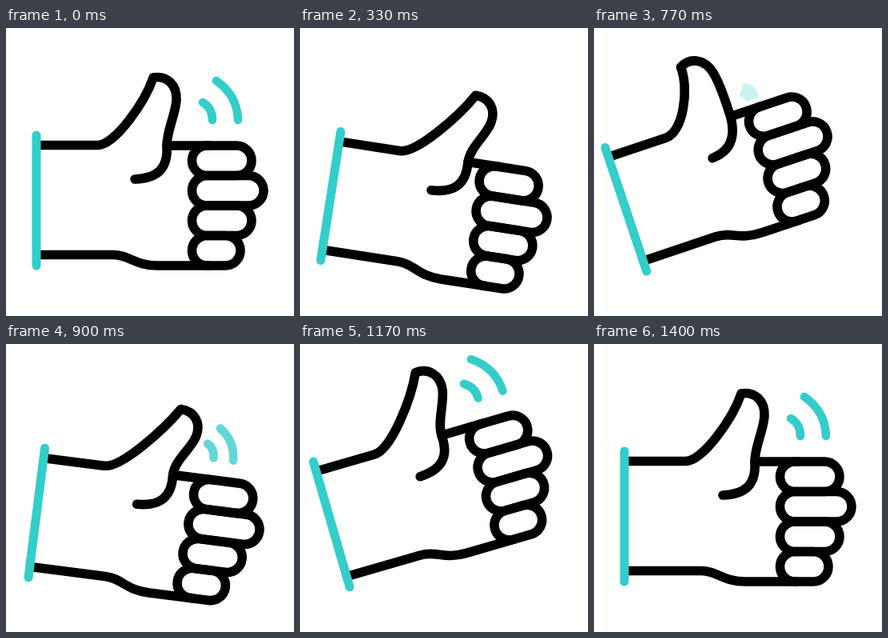
An HTML page that plays this animation: 360 by 360 pixels, repeating every 1.67 s.

```html
<!DOCTYPE html>
<html lang="en">
<head>
<meta charset="utf-8">
<title>Thumbs up</title>
<style>
  html, body { margin: 0; width: 100%; height: 100%; overflow: hidden; background: #fff; }
  svg { display: block; width: 100%; height: 100%; }
  path, rect { fill: none; stroke: #000; stroke-width: 11.6; stroke-linecap: round; stroke-linejoin: round; }
  .accent { stroke: #33cdca; stroke-width: 11; }
  .butt { stroke-linecap: butt; }
</style>
</head>
<body>
<svg viewBox="0 0 360 360">
  <g id="hand">
    <path id="thumb"/>
    <path id="knuckle"/>
    <path id="palm" class="butt"/>
    <g id="fingers"></g>
    <path class="accent" d="M38 134V297"/>
    <path id="waves" class="accent" d="M246 93Q258 100 258 115M263 66Q289 84 290 115"/>
  </g>
</svg>
<script>
const LOOP = 1670, STEP = 100 / 3;
const PIVOT = [73.5, 215.5];     // wrist
const JOINT = [201, 147];        // thumb base
const WAVE_ORIGIN = [217, 136];
const SHIFT = 15;                // how far the fingers pull back
const ROW = 37.5, LEFT = 232.5;
const WIDTHS = [74.5, 89.5, 74.5, 60.5];

// [time in ms, value], eased between neighbours
const SWING = [[67, 0], [467, 11.8], [710, -23.5], [930, 8.7], [1160, -16.2], [1400, 0]];
const BEND = [[67, 0], [400, 10], [750, -18], [920, 12], [1370, 0]];
const LENGTH = [[67, 1], [330, 0.965], [570, 0.95], [760, 1.03], [900, 0.955], [1400, 1]];
const CREASE = [[330, 0], [570, -6], [770, -6], [900, 0]];
const WAVES = [[67, 1], [300, 0], [640, 0], [1020, 1]];

const $ = id => document.getElementById(id);
const ease = u => (1 - Math.cos(Math.PI * Math.min(1, Math.max(0, u)))) / 2;

function sample(keys, t) {
  let value = keys[0][1];
  for (let i = 1; i < keys.length; i++) {
    const [t0, v0] = keys[i - 1], [t1, v1] = keys[i];
    if (t >= t0) value = v0 + (v1 - v0) * ease((t - t0) / (t1 - t0));
  }
  return value;
}

const fingers = WIDTHS.map((w, i) => {
  const r = document.createElementNS('http://www.w3.org/2000/svg', 'rect');
  const box = { x: LEFT, y: 147 + i * ROW, width: w, height: ROW, rx: ROW / 2 };
  for (const k in box) r.setAttribute(k, box[k]);
  return $('fingers').appendChild(r);
});

function pullBack(i, t) {
  const back = ease((t - 80 - 36 * i) / 300);
  const out = ease((t - 750 - 20 * i) / 210);
  return SHIFT * (back - out);
}

// Rotates points around the thumb base and scales the thumb's height
function bendPoints(deg, length, ...points) {
  const a = deg * Math.PI / 180, c = Math.cos(a), s = Math.sin(a);
  return points.map(([px, py]) => {
    const x = px - JOINT[0], y = py - JOINT[1];
    return (JOINT[0] + x * c - y * s).toFixed(2) + ' ' +
           (JOINT[1] + (x * s + y * c) * length).toFixed(2);
  }).join(' ');
}

function drawThumb(t) {
  const bend = sample(BEND, t), length = sample(LENGTH, t), pull = sample(CREASE, t);
  const joint = JOINT[0] + pull * 0.35;
  $('thumb').setAttribute('d',
    'M43 146.5H114C136 147 ' +
    bendPoints(bend * 0.85, length, [174, 92]) + ' ' +
    bendPoints(bend, length, [184, 62], [201, 59], [214, 71], [213, 90], [212, 108]) +
    ` ${joint} 128 ${joint} 147` +
    `C${203 + pull} 175 ${190 + pull} 188 161 189`);
}

function drawWaves(t) {
  const s = sample(WAVES, t), w = $('waves');
  w.style.display = s > 0.01 ? '' : 'none';
  if (s <= 0.01) return;
  const [x, y] = WAVE_ORIGIN;
  w.setAttribute('transform', `translate(${x} ${y}) scale(${s}) translate(${-x} ${-y})`);
  w.style.strokeWidth = 10.5 / s;
  w.style.opacity = s;
}

function draw(t) {
  $('hand').setAttribute('transform', `rotate(${sample(SWING, t)} ${PIVOT})`);
  drawThumb(t);
  const pull = fingers.map((f, i) => {
    const d = pullBack(i, t);
    f.setAttribute('x', LEFT - d);
    return d;
  });
  $('knuckle').setAttribute('d', `M201 147H${255 - pull[0]}`);
  $('palm').setAttribute('d', `M43 283.5H133C155 283.5 160 297 190 297H${255 - pull[3]}`);
  drawWaves(t);
}

function tick() {
  const t = performance.now() % LOOP;
  draw(Math.floor((t + 5) / STEP) * STEP);   // 30 poses per second
  requestAnimationFrame(tick);
}
tick();
</script>
</body>
</html>
```
